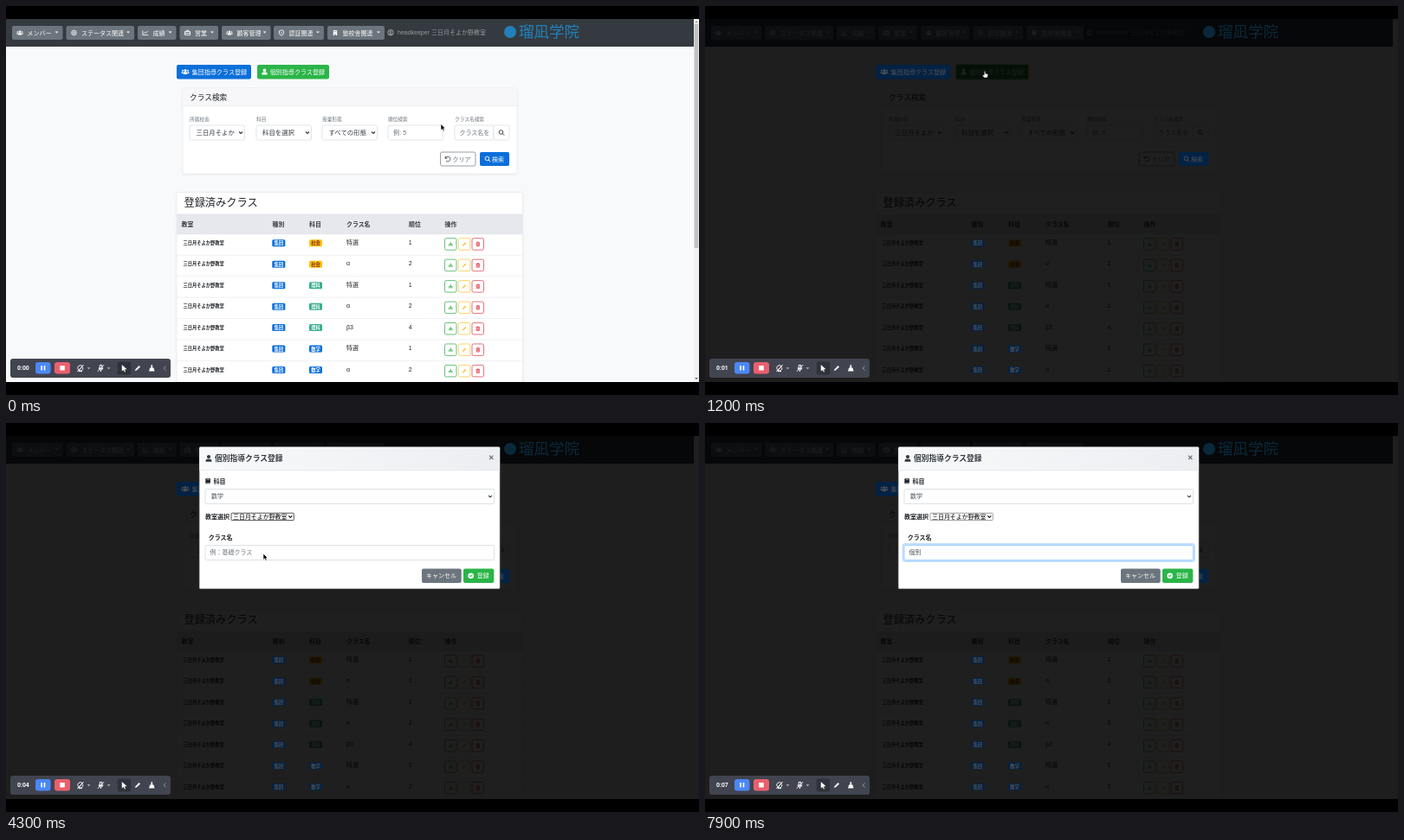
Recreate the animation shown at these times as an HTML page. Size 800x450 px, loop 8 s.

```html
<!DOCTYPE html>
<html lang="ja">
<head>
<meta charset="utf-8">
<title>クラス登録</title>
<style>
  html, body { margin: 0; width: 100%; height: 100%; overflow: hidden; background: #000; }
  svg { display: block; width: 100vw; height: 100vh; }
  text { font-family: "Liberation Sans", "Noto Sans CJK JP", "Noto Sans CJK", sans-serif; white-space: pre; }
</style>
</head>
<body>
<svg id="stage" viewBox="0 0 800 450"></svg>
<script>
const LOOP = 8000, TICK = 100;
const ROOM = '三日月そよか野教室', OTHER_ROOM = 'ほしみの教室';
const BLUE = '#0b6fda', GREEN = '#2bb548', GRAY = '#6c757d', INK = '#212529';

const rect = (x, y, w, h, fill, stroke = 'none', rx = 0, extra = '') =>
  `<rect x="${x}" y="${y}" width="${w}" height="${h}" fill="${fill}" stroke="${stroke}" stroke-width=".7" rx="${rx}" ${extra}/>`;
const text = (x, y, size, str, fill = INK, weight = 400, extra = '') =>
  `<text x="${x}" y="${y}" font-size="${size}" fill="${fill}" font-weight="${weight}" ${extra}>${str}</text>`;
const line = (d, stroke, width = 1, extra = '') =>
  `<path d="${d}" fill="none" stroke="${stroke}" stroke-width="${width}" ${extra}/>`;
const group = (id, body, extra = '') => `<g id="${id}" ${extra}>${body}</g>`;

// Icons are centred on the origin in a box about 8 units wide.
const ICONS = {
  user: ['M-3.3 3.6V2.5Q-3.3.6-1.4.6H1.4Q3.3.6 3.3 2.5V3.6ZM0-3.8A2 2 0 1 1 0 .2A2 2 0 1 1 0-3.8Z'],
  users: ['M-2.4 3V1.6Q-2.4.3-1 .3H1Q2.4.3 2.4 1.6V3ZM0-3A1.5 1.5 0 1 1 0 0A1.5 1.5 0 1 1 0-3ZM-4.3 2V.8Q-4.3 0-2.8 0V2ZM4.3 2V.8Q4.3 0 2.8 0V2ZM-3-2.2A1 1 0 1 1-3-.2A1 1 0 1 1-3-2.2ZM3-2.2A1 1 0 1 1 3-.2A1 1 0 1 1 3-2.2Z'],
  target: ['M0-3.3A3.3 3.3 0 1 1 0 3.3A3.3 3.3 0 1 1 0-3.3M0-1.4A1.4 1.4 0 1 1 0 1.4A1.4 1.4 0 1 1 0-1.4', 1],
  chart: ['M-3.7-3V3H3.8M-2.2 1L-.5-1L.8.2L3.3-2.5', 1],
  bag: ['M-3.6-1.8H3.6V3H-3.6ZM-1.4-1.8V-3.2H1.4V-1.8M-3.6.6H3.6', 1],
  pin: ['M0-3.8L3-2.5V0Q3 2.6 0 3.8Q-3 2.6-3 0V-2.5ZM0-1.5V1', 1],
  building: ['M-2.6-3.6H2.6V3.6H.8V1.8H-.8V3.6H-2.6ZM-1.5-2.4V-1H-.5V-2.4ZM.5-2.4V-1H1.5V-2.4Z'],
  face: ['M0-3.2A3.2 3.2 0 1 1 0 3.2A3.2 3.2 0 1 1 0-3.2M0-1.6A1 1 0 1 1 0 .4A1 1 0 1 1 0-1.6M-2 2.3Q0 .3 2 2.3', 1],
  lens: ['M-.6-3A2.4 2.4 0 1 1-.6 1.8A2.4 2.4 0 1 1-.6-3M1.1 1.1L3.3 3.3', 1],
  undo: ['M-3-3.2V-.8H-.6M-2.8-1A3 3 0 1 1-2 2.2', 1],
  tree: ['M0-2.7V0M-2.4 2V.2H2.4V2M0 0V2M-.6-2.4H.6M-3 2.3H-1.8M-.6 2.3H.6M1.8 2.3H3', 1],
  pen: ['M-3 3L-2.5 1.2L1.6-3L3-1.6L-1.2 2.5Z'],
  bin: ['M-2.8-2.2H2.8M-1-2.2V-3.1H1V-2.2M-2.1-2.2V3H2.1V-2.2M-.7-1V2M.7-1V2', 1],
  book: ['M-2.8-3.4H3V2H-2V2.6H3V3.4H-2.2Q-3.2 3.4-3.2 2.4V-2.6Q-3.2-3.4-2.8-3.4ZM-1.4-2V-1.3H1.8V-2Z'],
  check: ['M0-3.5A3.5 3.5 0 1 1 0 3.5A3.5 3.5 0 1 1 0-3.5ZM-2 0L-.5 1.7L2.2-1L1.5-1.7L-.5.3L-1.3-.7Z'],
  camera: ['M-2.6 1.6A3 3 0 1 1 2.4-2L-2 2.4A3 3 0 0 0 2.8-.6M-3.6 4L3.6-4M-2 3.6H2', 1],
  mic: ['M-1.2-3.6H1.2V.5H-1.2ZM-2.4-.6Q-2.4 2 0 2Q2.4 2 2.4-.6M0 2V4M-3.5 3.8L3.5-3.8', 1],
  arrow: ['M-2.5-4L3.2 1.2L.4 1.5L1.8 4L.7 4.5L-.6 1.9L-2.5 3.6Z'],
  stamp: ['M-.8-3.8H.8V-.5H2.2L3.2 3.6H-3.2L-2.2-.5H-.8Z'],
};
const icon = (name, x, y, color, scale = 1) => {
  const [d, outlined] = ICONS[name];
  const paint = outlined ? `fill="none" stroke="${color}" stroke-width="1"` : `fill="${color}" fill-rule="evenodd"`;
  return `<path d="${d}" ${paint} transform="translate(${x} ${y}) scale(${scale})"/>`;
};
const chevron = (x, y, color = '#343a40') => line(`M${x - 2} ${y - 1}l2 2l2-2`, color, 1.1);
const caretDown = (x, y, fill = '#fff') => `<path d="M${x - 1.8} ${y - 1}h3.6l-1.8 2z" fill="${fill}"/>`;
const field = (x, y, w, id = '') => rect(x, y, w, 17, '#fff', '#d5dade', 1.8, id && `id="${id}"`);

function navbar() {
  const menus = [
    [7, 58.5, 'users', 'メンバー'], [69.5, 78.5, 'target', 'ステータス関連'], [152, 44.5, 'chart', '成績'],
    [200.5, 44.5, 'bag', '営業'], [249, 56.5, 'users', '顧客管理'], [309, 58, 'pin', '認証関連'],
    [371, 66, 'building', '塾校舎関連'],
  ];
  return rect(0, 15, 794, 32, '#343a40') + menus.map(([x, w, name, label]) =>
    rect(x, 23, w, 16, GRAY, 'none', 2) + icon(name, x + 9, 31, '#fff', .85) +
    text(x + 17.5, 33.5, 7, label, '#fff') + caretDown(x + w - 7, 30.5)).join('') +
    icon('face', 444, 30.7, '#a5a8ac') +
    text(452, 33.3, 7, 'headkeeper', '#979a9e') + text(491, 33.3, 7, ROOM, '#979a9e');
}

function searchCard() {
  const labels = [[212, '所属校舎'], [289, '科目'], [365, '授業形態'], [441, '順位検索'], [518, 'クラス名検索']];
  return rect(204, 95, 386, 99, '#fff', '#e6e8eb', 2, 'filter="url(#soft)"') +
    rect(204.3, 95.3, 385.4, 20, '#f7f7f9') + line('M204 115.5H590', '#e6e8eb', .7) +
    text(212, 108.5, 8.7, 'クラス検索') +
    labels.map(([x, s]) => text(x, 132.8, 5.7, s, GRAY)).join('') +
    [212, 289, 365].map(x => field(x, 138, 63.5) + chevron(x + 59, 146.5)).join('') +
    field(441, 138, 63.5) + field(518, 138, 45) + field(563, 138, 18) +
    text(219.5, 149, 7.4, ROOM.slice(0, 6), '#343a40') +
    text(296, 149, 7.4, '科目を選択', '#343a40') + text(372.5, 149, 7.4, 'すべての形態', '#343a40') +
    text(447, 149, 7.2, '例: 5', GRAY) + text(523.5, 149, 7, 'クラス名を', GRAY) +
    icon('lens', 572, 146.5, '#343a40', .95) +
    rect(501.5, 169, 40.5, 16, '#fff', GRAY, 2) + icon('undo', 510, 177, '#495057', .95) +
    text(515.5, 179.6, 7, 'クリア', GRAY);
}

const rowTop = i => 264 + i * 24.45;
const ROWS = [['社会', '特選', 1], ['社会', 'α', 2], ['理科', '特選', 1], ['理科', 'α', 2],
              ['理科', 'β3', 4], ['数学', '特選', 1], ['数学', 'α', 2]];
const BADGE = { 社会: '#ffc107', 理科: '#35ad8c' };
const badge = (x, y, s, fill, ink = '#fff') =>
  rect(x, y, 15, 8, fill, 'none', 1.5) + text(x + 2.2, y + 6, 5.3, s, ink, 700);

function table() {
  const heads = [[202.5, '教室'], [307.5, '種別'], [350, '科目'], [393, 'クラス名'], [465, '順位'], [506.5, '操作']];
  const tools = [[506.5, 'tree', '#28a745'], [522.3, 'pen', '#f4c432'], [538, 'bin', '#dc3545']];
  return rect(197, 215.5, 399.5, 230, '#fff', '#e6e8eb', 2, 'filter="url(#soft)"') +
    text(205.5, 232, 12.2, '登録済みクラス') +
    rect(197, 241, 399.5, 23, '#e7e8ed') + line('M197 241H596.5M197 263.7H596.5', '#dfe2e6', .7) +
    heads.map(([x, s]) => text(x, 254.6, 6.9, s, '#343a40', 700)).join('') +
    ROWS.map(([subject, name, rank], i) => {
      const y = rowTop(i);
      return line(`M197 ${y + 24.2}H596.5`, '#e9ebee', .7) +
        text(204.5, y + 12, 5.25, ROOM, INK, 700) +
        (BADGE[subject] ? badge(350, y + 6.3, subject, BADGE[subject], subject === '社会' ? '#7a2330' : '#fff') : '') +
        text(393, y + 12, 7, name) + text(464.7, y + 12, 7, rank) +
        tools.map(([x, glyph, c]) => rect(x, y + 4.7, 13.5, 13.5, '#fff', c, 1.8) +
          icon(glyph, x + 6.8, y + 11.5, c, .75)).join('');
    }).join('');
}

function blueParts() {
  return rect(197, 68, 86, 16.5, BLUE, 'none', 2) + icon('users', 207, 76, '#fff', 1) +
    text(214.5, 78.7, 7.1, '集団指導クラス登録', '#fff') +
    rect(547, 169, 34, 16, BLUE, 'none', 2) + icon('lens', 556, 177, '#fff', .95) +
    text(561, 179.6, 7, '検索', '#fff') +
    '<circle cx="582" cy="30" r="7" fill="#2180b8"/>' +
    text(592, 36, 17.5, '瑠凪学院', '#2180b8', 500) +
    ROWS.map(([subject], i) => badge(307.3, rowTop(i) + 6.3, '集団', BLUE) +
      (subject === '数学' ? badge(350, rowTop(i) + 6.3, subject, BLUE) : '')).join('');
}

function modal() {
  return rect(223, 27.5, 347.3, 164.5, '#fff', '#3a3b3d', 1.5) +
    rect(223.3, 27.8, 346.7, 27, 'url(#head)', 'none', 1.5) + line('M223 54.8H570', '#e1e4e8', .7) +
    icon('user', 234, 41, '#343a40', 1.05) + text(241, 44, 8.75, '個別指導クラス登録', '#343a40', 700) +
    line('M558 37.7l4.4 4.4m0-4.4l-4.4 4.4', '#666', 1.1) +
    icon('book', 233.2, 67.2, INK, .9) + text(239.5, 69.8, 7, '科目', INK, 700) +
    rect(228.6, 75, 336.4, 20, 'none', '#bfdeff', 3, 'id="ring1" style="stroke-width:2"') +
    field(230, 76.5, 333.5, 'subjectBox') + text(237, 87.4, 7, '', '#495057', 400, 'id="subject"') + chevron(559, 84.8) +
    text(230, 110.6, 7, '教室選択', INK, 700) +
    rect(260, 104.2, 72.3, 8.4, '#fff', '#767676', 1, 'id="roomBox"') +
    text(262, 110.8, 6.95, '', '#000', 400, 'id="room"') + chevron(328.3, 108.3, '#000') +
    text(233.7, 135, 7, 'クラス名', INK, 700) +
    rect(228.6, 140, 336.4, 20, 'none', '#bfdeff', 3, 'id="ring2" style="stroke-width:2"') +
    field(230, 141.5, 333.5, 'nameBox') + text(235.5, 152.2, 7, '', GRAY, 400, 'id="className"') +
    rect(0, 146, .7, 8, '#222', 'none', 0, 'id="caret"') +
    line('', '#333', .6, 'id="underline"') +
    rect(480, 168.5, 45.7, 16.5, GRAY, 'none', 2) + text(485, 179.3, 7, 'キャンセル', '#fff') +
    rect(528, 168.5, 35.3, 16.5, GREEN, 'none', 2) + icon('check', 536.7, 176.7, '#fff', .95) +
    text(543.7, 179.3, 7, '登録', '#fff');
}

function recorder() {
  return rect(5, 408, 185, 22, '#42444f', 'none', 3) +
    text(13, 421.3, 6.9, '', '#fff', 700, 'id="clock" style="font-family:Roboto,Inter,sans-serif"') +
    rect(34, 412, 17.5, 13.5, '#4b88f6', 'none', 3) + rect(40.3, 416, 1.6, 5.5, '#fff') + rect(43.7, 416, 1.6, 5.5, '#fff') +
    rect(56, 412, 18, 13.5, '#e8606d', 'none', 3) + rect(62.3, 416, 5.5, 5.5, '#fff', 'none', .6) +
    rect(128.7, 411.5, 15.5, 15, '#30323b', 'none', 2) +
    [['camera', 86], ['mic', 109.5], ['arrow', 136.3], ['pen', 152], ['stamp', 168.3]]
      .map(([n, x]) => icon(n, x, 419, '#fff')).join('') +
    caretDown(95.5, 419.3, '#bbb') + caretDown(118.5, 419.3, '#bbb') +
    line('M184.5 416.5l-2.3 2.5l2.3 2.5', '#9a9ca5', .9);
}

const pointers =
  '<path id="arrowPtr" d="M0 0V7.2L1.7 5.7L2.9 8.2L4.2 7.6L3 5.2H5.2Z" fill="#000" stroke="#fff" stroke-width=".6"/>' +
  '<path id="handPtr" d="M-.8 4.5V.7Q0-.3.8.7V3L3.5 3.7Q4 4 3.8 5L3 8H-1L-3 5Q-2.3 4-.8 5Z" fill="#fff" stroke="#000" stroke-width=".6"/>' +
  '<path id="beamPtr" d="M-1.6-4Q0-4 0-3Q0-4 1.6-4M0-3V3M-1.6 4Q0 4 0 3Q0 4 1.6 4" fill="none" stroke="#222" stroke-width=".8"/>';

stage.innerHTML = `<defs>
  <linearGradient id="head"><stop stop-color="#f8f9fa"/><stop offset="1" stop-color="#eceef2"/></linearGradient>
  <filter id="soft" x="-5%" y="-5%" width="110%" height="115%"><feDropShadow dx="0" dy="1" stdDeviation="1.2" flood-opacity=".07"/></filter>
  </defs>` +
  rect(0, 15, 800, 420, '#f8f9fb') + navbar() +
  group('scrollbar', rect(794, 15, 6, 420, '#f1f1f1') + rect(794.6, 21, 4.6, 259, '#c1c1c1') +
    caretDown(797, 431, '#555') + '<path d="M795.2 19.3h3.6l-1.8-2z" fill="#888"/>') +
  rect(289.5, 67.5, 84, 17.5, 'none', '#94d3a2', 2.5, 'id="openRing" style="stroke-width:1.5"') +
  rect(290, 68, 83, 16.5, GREEN, 'none', 2, 'id="openBtn"') + icon('user', 298.5, 76, '#fff', .95) +
  text(304.7, 78.7, 7.05, '個別指導クラス登録', '#fff') +
  searchCard() + table() + blueParts() +
  rect(0, 15, 800, 420, '#000', 'none', 0, 'id="shade"') +
  // A faint copy keeps the blue parts visible through the backdrop.
  group('glow', blueParts(), 'opacity=".22"') +
  group('dialog', modal()) +
  rect(0, 0, 800, 15, '#000') + rect(0, 435, 800, 15, '#000') +
  recorder() + group('pointer', pointers);

const el = id => document.getElementById(id);
const set = (id, attrs) => { for (const k in attrs) el(id).setAttribute(k, attrs[k]); };

// Tables hold [time, ...values]; hold() steps, glide() interpolates.
const hold = (table, t) => table.filter(row => row[0] <= t).pop().slice(1);
const glide = (table, t) => {
  const i = table.findIndex(row => row[0] > t);
  if (i < 0) return table[table.length - 1].slice(1);
  const a = table[i - 1], b = table[i], k = (t - a[0]) / (b[0] - a[0]);
  return a.slice(1).map((v, j) => v + (b[j + 1] - v) * k);
};

const PATH = [[0, 502, 136.5], [100, 480, 127], [200, 432, 108], [300, 375, 87], [400, 340, 77], [500, 328, 74],
  [600, 328, 74], [800, 323, 75], [1400, 323, 75], [1700, 323.5, 84.5], [2800, 323.5, 84.5],
  [2900, 309, 131], [3300, 297, 107], [4200, 297, 107], [4300, 297, 151], [5000, 297, 151], [5100, 297.3, 152]];
const POINTER = [[0, 'arrowPtr'], [400, 'handPtr'], [1400, 'arrowPtr'], [5000, 'beamPtr'], [7500, '']];
const SHADE = [[0, 0], [900, 0], [1000, .15], [1100, .5], [1200, .88]];
const DIALOG = [[0, 0, -50], [1200, 0, -50], [1300, .35, -35], [1400, .8, -18], [1500, 1, -8], [1600, 1, -3], [1800, 1, 0]];
const RING1 = [[0, 0], [1800, 0], [2100, 1], [3400, 1], [3700, 0]];
const RING2 = [[0, 0], [5100, 0], [5400, 1]];
const SUBJECT = [[0, '科目を選択してください'], [2900, '数学']];
const CLASS_NAME = [[0, '例：基礎クラス'], [6500, 'k'], [6600, 'こb'], [6700, 'こべつ'], [7200, '個別']];
const CARET = [[0, 0], [5300, 235], [5800, 0], [6200, 235], [6500, 239.5], [6600, 247], [6700, 257], [7200, 250], [7900, 0]];
const UNDERLINE = [[0, 0], [6500, 4], [6600, 11], [6700, 21], [7200, 14], [7300, 0]];

function draw(t) {
  const [x, y] = glide(PATH, t), [kind] = hold(POINTER, t);
  set('pointer', { transform: `translate(${x} ${y})` });
  for (const id of ['arrowPtr', 'handPtr', 'beamPtr']) set(id, { visibility: id === kind ? 'visible' : 'hidden' });

  set('shade', { opacity: glide(SHADE, t)[0] });
  set('scrollbar', { opacity: t < 1000 ? 1 : 0 });
  set('openBtn', { fill: t < 400 ? GREEN : '#218838' });
  set('openRing', { opacity: t < 1000 ? 0 : 1 });

  const [opacity, dy] = glide(DIALOG, t);
  set('dialog', { opacity, transform: `translate(0 ${dy})` });
  const [ring1] = glide(RING1, t), [ring2] = glide(RING2, t);
  set('ring1', { opacity: ring1 });
  set('ring2', { opacity: ring2 });
  set('subjectBox', { stroke: ring1 > .5 ? '#80bdff' : '#ced4da' });
  set('nameBox', { stroke: ring2 > .5 ? '#80bdff' : '#ced4da' });
  set('roomBox', { stroke: t >= 3500 && t < 5200 ? '#101010' : '#767676' });

  el('subject').textContent = hold(SUBJECT, t)[0];
  el('room').textContent = t < 4300 ? OTHER_ROOM : ROOM;
  el('className').textContent = hold(CLASS_NAME, t)[0];
  set('className', { fill: t < 6500 ? GRAY : '#495057' });
  const [caretX] = hold(CARET, t);
  set('caret', { x: caretX, opacity: caretX ? 1 : 0 });
  set('underline', { d: `M235.5 154.5h${hold(UNDERLINE, t)[0]}` });
  el('clock').textContent = `0:0${Math.floor(t / 1000)}`;
}

const start = performance.now();
function frame() {
  const t = (performance.now() - start) % LOOP;
  draw(Math.floor(t / TICK) * TICK);
  requestAnimationFrame(frame);
}
frame();
</script>
</body>
</html>
```
